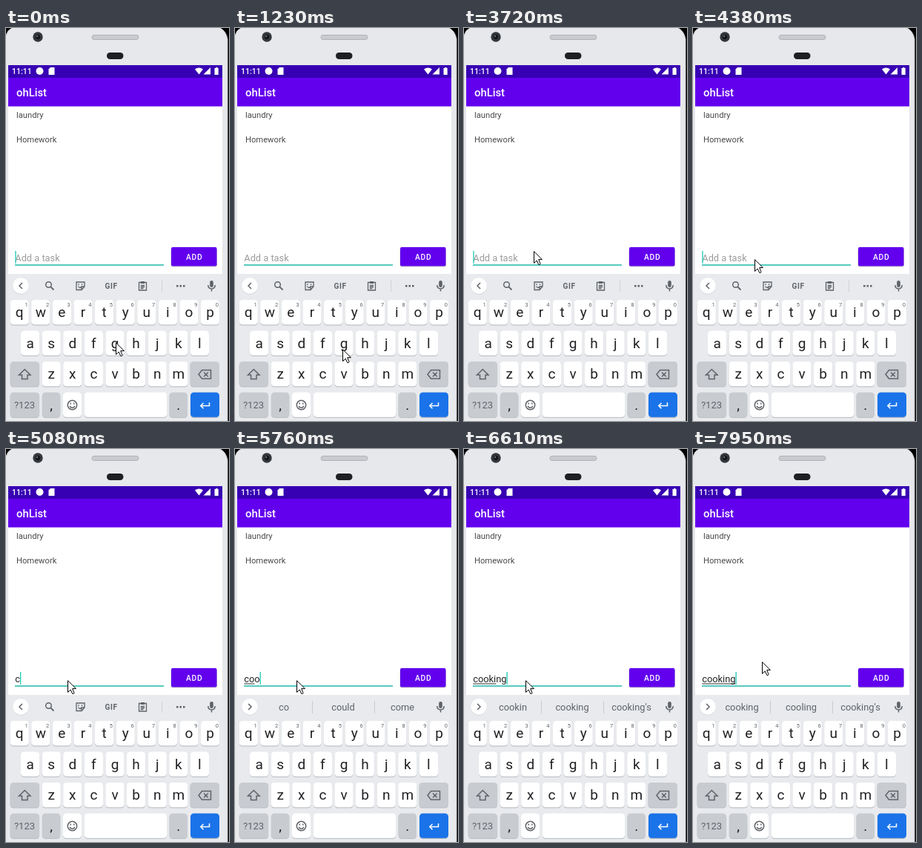
These frames come from a looping animation (301x529 px, 8000 ms). An HTML page:

```html
<!DOCTYPE html>
<html lang="en">
<head>
<meta charset="utf-8">
<title>Task list</title>
<style>
  html, body { margin: 0; width: 100%; height: 100%; overflow: hidden; background: #000; }
  svg { display: block; width: 100%; height: 100%; font-family: Roboto, Arial, sans-serif; }
  .mid { text-anchor: middle; }
  .icon { fill: none; stroke: #5f6368; stroke-width: 1.5; }
  .key { font-size: 19px; fill: #202124; }
  .digit { font-size: 7.5px; fill: #5f6368; }
  .field { font-size: 12.8px; }
  .hint { fill: #5f6368; }
</style>
</head>
<body>
<svg viewBox="0 0 301 529" preserveAspectRatio="none">
  <!-- phone body -->
  <path d="M0 529V10Q2 3 8 0H289Q297 4 299 15V529Z" fill="#e7e8eb"/>
  <path d="M0 10Q2 3 8 0M289 0Q297 4 299 15V529" fill="none" stroke="#c6c8cc"/>
  <circle cx="43" cy="12" r="6.7" fill="#34373c"/>
  <circle cx="43" cy="12" r="3.2" fill="#15171a"/>
  <circle cx="42" cy="11" r="1.2" fill="#666b75"/>
  <rect x="116" y="9.500" width="63" height="6" rx="3" fill="#c9cbcf" stroke="#b0b3b8"/>
  <rect x="136" y="33" width="22.500" height="9" rx="4.500" fill="#1d1f23"/>

  <!-- app -->
  <rect x="3" y="50" width="289" height="479" fill="#fff"/>
  <rect x="3" y="50" width="289" height="17" fill="#3700b3"/>
  <rect x="3" y="67" width="289" height="38.500" fill="#6200ee"/>
  <g fill="#fff">
    <text x="8" y="62" font-size="10.500" font-weight="500">11:11</text>
    <circle cx="45.500" cy="58" r="5"/>
    <path d="M60 53H65.500V63H57.500V55.500Z"/>
    <path d="M255 55.500Q260.500 51.500 266 55.500L260.500 62.500Z"/>
    <path d="M276 53V62.500H266.500Z"/>
    <path d="M282 54H283.200V53H285.500V54H286.700V63H281.500V54Z"/>
    <text x="14" y="92" font-size="14.800" font-weight="500">ohList</text>
  </g>
  <g font-size="11.200" fill="#4a4a4a">
    <text x="14" y="121">laundry</text>
    <text x="14" y="154">Homework</text>
  </g>
  <text id="hint" class="field" x="12.300" y="314" fill="#9c9c9c">Add a task</text>
  <text id="typed" class="field" x="12.300" y="314" fill="#222"></text>
  <rect id="under" x="12.300" y="315.500" height="1" fill="#333"/>
  <rect x="12" y="318.300" width="201" height="1.500" fill="#20b9aa"/>
  <rect id="caret" y="300" width="1.300" height="17" fill="#20c9b8"/>
  <rect x="222.500" y="296.500" width="62.500" height="25" rx="2.500" fill="#c9c9c9"/>
  <rect x="223" y="295" width="61.500" height="25.500" rx="2" fill="#6200ee"/>
  <text class="mid" x="254.300" y="311.800" font-size="10.300" font-weight="500" letter-spacing=".8" fill="#fff">ADD</text>

  <!-- keyboard -->
  <rect x="3" y="331" width="289" height="198" fill="#e8eaed"/>
  <circle cx="20" cy="348" r="10.700" fill="#d5d8dc"/>
  <circle cx="20" cy="347" r="10.700" fill="#fff"/>
  <path id="chevron" class="icon"/>
  <g id="tools" class="icon">
    <circle cx="57.500" cy="345.500" r="3.800"/>
    <path d="M60.300 348.300L64.500 352.500" stroke-width="1.800"/>
    <path d="M95 342H106V348L102 352.500H95ZM102 352V348H106M97.500 347.500Q99.500 351 101.500 348.500" stroke-width="1.300"/>
    <path d="M98 344.300V346M102.500 344.300V346" stroke-width="1.300"/>
    <text class="mid" x="142" y="351" font-size="10" font-weight="700" letter-spacing=".6" fill="#5f6368" stroke="none">GIF</text>
    <path d="M179.500 342.500H189.500V353H179.500Z M181.800 346.500H187M181.800 348.500H187M181.800 350.500H185.500" stroke-width="1.300"/>
    <path d="M182 342.500H187" stroke-width="3"/>
    <path d="M210.500 340V355" stroke="#cfd2d6" stroke-width="1"/>
    <path d="M230 347.300H232.500M234.500 347.300H237M239 347.300H241.500" stroke-width="2.600"/>
  </g>
  <g id="bar">
    <path d="M104.500 339V356M188.500 339V356" stroke="#c8cbcf"/>
    <text class="field mid hint" x="66" y="352"></text>
    <text class="field mid hint" x="146" y="352"></text>
    <text class="field mid hint" x="226" y="352"></text>
  </g>
  <rect x="275.200" y="340" width="4.600" height="9" rx="2.300" fill="#5f6368"/>
  <path class="icon" d="M272.800 346Q273 351 277.500 351Q282 351 282.200 346M277.500 351V354.500"/>
  <g id="keys"></g>
  <path class="icon" d="M25.300 459.500L33 467H29V472.500H21.500V467H17.500Z"/>
  <path class="icon" d="M264.500 460.500H276.500V472H264.500L260 466.200ZM267 463.500L272.800 469.200M272.800 463.500L267 469.200"/>
  <circle class="icon" cx="89.500" cy="507.500" r="6.200"/>
  <path class="icon" d="M86 509Q89.500 513.500 93 509"/>
  <path class="icon" d="M87.200 504.500V506.500M91.800 504.500V506.500"/>
  <path class="icon" d="M274.500 504V508.500H263M266.500 504.800L262.800 508.500L266.500 512.200" style="stroke:#fff"/>

  <path id="cursor" d="M.5 .8V16.500L4.200 13L6.800 18.500H8.300L9 17.300L6.700 11.600H11.400Z" fill="#fff" stroke="#000"/>
</svg>
<script>
const $ = id => document.getElementById(id);
const LOOP = 8000, LEFT = 12.3;

// Static keys
function key(x, y, w, label = '', fill = '#fff', cls = 'key') {
  return `<rect x="${x}" y="${y + 1}" width="${w}" height="33.5" rx="4.5" fill="#bfc2c7"/>
    <rect x="${x}" y="${y}" width="${w}" height="33.2" rx="4.5" fill="${fill}"/>
    <text class="${cls} mid" x="${x + w / 2}" y="${y + 23}">${label}</text>`;
}
const PITCH = 28.6, GREY = '#c8ccd1';
const row = (letters, x, y) =>
  [...letters].map((c, i) => key(x + i * PITCH, y, 25.2, c)).join('');
const digits = [...'1234567890'].map((d, i) =>
  `<text class="digit mid" x="${27.5 + i * PITCH}" y="375">${d}</text>`).join('');
$('keys').innerHTML =
  row('qwertyuiop', 5.6, 366) + digits +
  row('asdfghjkl', 20, 407.5) +
  key(5.6, 449, 39.5, '', GREY) + row('zxcvbnm', 48.6, 449) + key(248.5, 449, 39.5, '', GREY) +
  key(5.6, 490.5, 39.5, '', GREY) +
  '<text class="mid hint" x="25" y="512" font-size="13">?123</text>' +
  key(48.8, 490.5, 24.5, ',', GREY) + key(77, 490.5, 25) + key(105.8, 490.5, 111.5) +
  key(220.5, 490.5, 24.5, '.', GREY) + key(249, 490.5, 39, '', '#1a73e8');

// [time, text, underlined letters, suggestions]
const typing = [
  [0, '', 0, ''],
  [5080, 'c', 0, ''],
  [5360, 'c', 0, 'c can call'],
  [5480, 'co', 1, 'c can call'],
  [5760, 'coo', 2, 'co could come'],
  [5910, 'coo', 3, 'coo cool cook'],
  [6030, 'cook', 3, 'coo cool cook'],
  [6150, 'cook', 4, 'cook cooking cool'],
  [6300, 'cooki', 4, 'cook cooking cookies'],
  [6610, 'cooking', 5, "cookin cooking cooking's"],
  [6860, 'cooking', 7, "cooking cooling cooking's"]
];

// Caret toggles, starting visible
const blinks = [130, 630, 1090, 1640, 2060, 2590, 3050, 3600, 4140, 4380, 7290, 7800];

// [time, x, y]; no position means hidden
const moves = [
  [0, 148, 423], [1230, 145, 432], [1360, 136, 452], [1490, 128, 465],
  [1640, 127, 465], [1790, 125, 465], [3450], [3600, 92, 300], [3720, 94, 300],
  [3870, 92, 297], [3990, 85, 307], [4140, 85, 309], [4260, 84, 311],
  [4380, 83, 311], [7950, 93, 286]
];

const at = (list, t) => list.findLast(step => step[0] <= t);
const pen = document.createElement('canvas').getContext('2d');
pen.font = '12.8px Roboto, Arial, sans-serif';
const width = s => pen.measureText(s).width;
const show = (el, on) => el.setAttribute('visibility', on ? 'visible' : 'hidden');
const labels = $('bar').querySelectorAll('text');

function render(t) {
  const [, text, count, words] = at(typing, t);
  $('typed').textContent = text;
  show($('hint'), !text);
  $('under').setAttribute('width', width(text.slice(0, count)));
  $('caret').setAttribute('x', LEFT + width(text));
  show($('caret'), blinks.filter(b => b <= t).length % 2 === 0);

  show($('tools'), !words);
  show($('bar'), words);
  const list = words.split(' ');
  labels.forEach((el, i) => { el.textContent = list[i] || ''; });
  $('chevron').setAttribute('d', words
    ? 'M18 343L22 347L18 351' : 'M22 343L18 347L22 351');

  const [, x, y] = at(moves, t);
  show($('cursor'), x !== undefined);
  if (x !== undefined) $('cursor').setAttribute('transform', `translate(${x} ${y})`);
}

const start = performance.now();
function tick() {
  render((performance.now() - start) % LOOP);
  requestAnimationFrame(tick);
}
tick();
</script>
</body>
</html>
```
